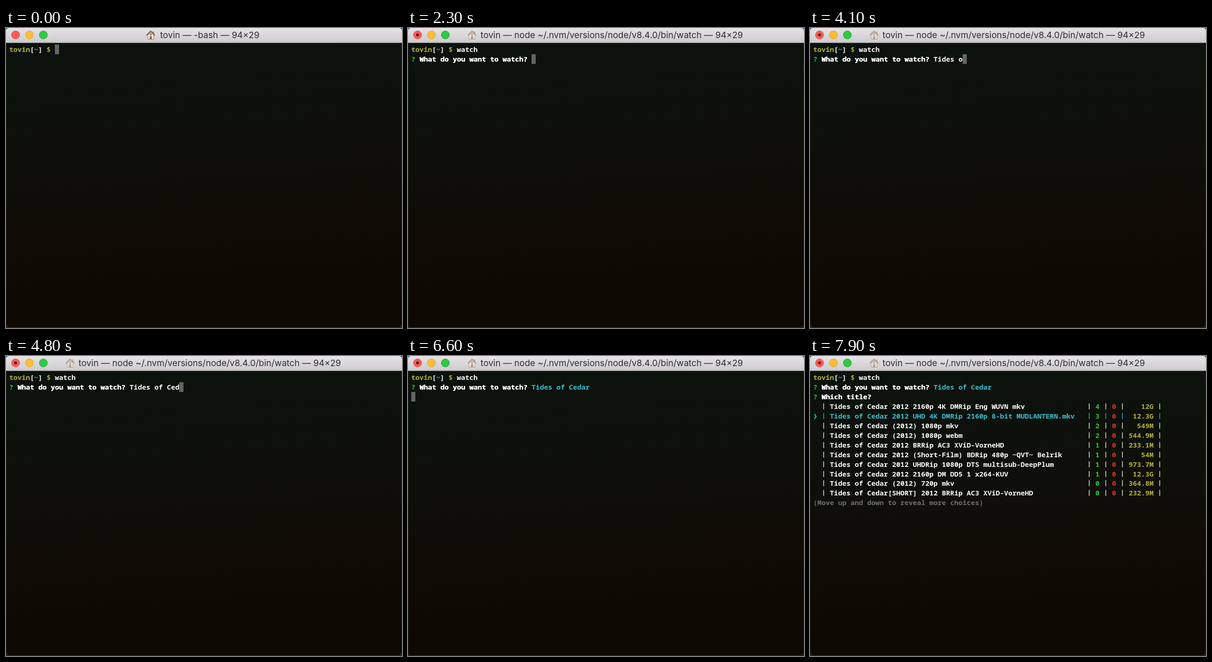
Recreate the animation shown at these times as an HTML page. Size 859x652 px, loop 8000 ms.

```html
<!DOCTYPE html>
<html lang="en">
<head>
<meta charset="utf-8">
<title>Terminal session</title>
<style>
  html, body { margin: 0; width: 100%; height: 100%; overflow: hidden; background: #2b2013; }
  #win {
    position: absolute; left: 0; top: 0; width: 859px; height: 652px; overflow: hidden;
    background: linear-gradient(#2d6480, #24372f 8px, #2b2013);
  }
  #body {
    position: absolute; left: 0; top: 0; width: 858px; height: 650px; box-sizing: border-box;
    border-left: 1px solid #1e211c; border-radius: 7px;
    background: linear-gradient(176deg, #0b120d 6%, #0f0f09 42%, #0f0b05 68%, #0e0803 88%);
  }
  #bar { position: absolute; left: 0; top: 0; width: 859px; height: 33px; }
  #bar text { font: 400 19px Inter, Roboto, sans-serif; fill: #2e2d2f; text-anchor: middle; }
  #term { font: 600 15px/21px "Noto Sans Mono", "DejaVu Sans Mono", monospace; color: #fbfbf9; }
  .row { position: absolute; left: 7px; height: 21px; white-space: pre; font-variant-ligatures: none; }
  .row span { white-space: pre; }
  .olive { color: #b2b138; }
  .cyan { color: #38bfd0; }
  .green { color: #34c437; }
  .red { color: #cd3720; }
  .gray { color: #6e6e6a; }
  .bold { font-weight: 700; }
  .ask { font-weight: 800; color: #fff; text-shadow: .5px 0 #fff; }
  .row .pipe, .row .mark {
    display: inline-block; width: 9px; text-align: center; line-height: 1;
    position: relative; font-weight: 700;
  }
  .pipe { font-size: 12px; top: -2px; }
  .mark { font-size: 15px; font-family: "DejaVu Sans Mono", "DejaVu Sans", monospace; }
  #cursor { position: absolute; width: 9px; height: 21px; background: #646462; }
</style>
</head>
<body>
<div id="win">
  <div id="body"></div>
  <svg id="bar" viewBox="0 0 859 33">
    <defs>
      <linearGradient id="metal" x2="0" y2="1">
        <stop offset="0" stop-color="#e5e3e5"/>
        <stop offset="1" stop-color="#cdcbcd"/>
      </linearGradient>
    </defs>
    <path d="M0 32V7Q0 0 7 0H852Q859 0 859 7V32Z" fill="url(#metal)"/>
    <path d="M0 32H859" stroke="#a5a6a3"/>
    <circle cx="20.7" cy="15" r="8.8" fill="#fc5b55" stroke="#df4843"/>
    <circle cx="50.8" cy="15" r="8.8" fill="#fdbd36" stroke="#dea032"/>
    <circle cx="81" cy="15" r="8.8" fill="#2fc843" stroke="#25a936"/>
    <circle id="dot" cx="20.7" cy="15" r="3.1" fill="#51100c"/>
    <g id="home">
      <path d="M14.5 2.5h2.5v5l-2.5-2z" fill="#96674a"/>
      <path d="M3.5 10L10 4.2L16.5 10V19.5H3.5Z" fill="#f1ead9" stroke="#8b7c68"/>
      <path d="M.8 10.8L10 2L19.2 10.8" fill="none" stroke="#896046" stroke-width="2.4"/>
      <path d="M8.2 7.6h3.6v3.2h-3.6z" fill="#6fa0bd" stroke="#75695b" stroke-width=".7"/>
      <path d="M8.2 13.2h3.6v6h-3.6z" fill="#a35e37" stroke="#75513d" stroke-width=".7"/>
    </g>
    <text id="title" x="442" y="22.3"></text>
  </svg>
  <div id="term"></div>
</div>
<script>
const LOOP = 8000;
const USER = "tovin", FILM = "Tides of Cedar", QUESTION = "What do you want to watch?";

// Times in ms
const ENTER_CMD = 1400, NODE = 1500, ASK = 2300, ENTER_FILM = 5500, LIST = 6700, DOWN = 7800;
const CMD_KEYS = [600, 700, 800, 1000, 1100];
const filmKey = i => Math.floor((3300 + (i + 1) * 125) / 100) * 100;

// name after the film title, seeders, size
const CHOICES = [
  [" 2012 2160p 4K DMRip Eng WUVN mkv", 4, "12G"],
  [" 2012 UHD 4K DMRip 2160p 8-bit MUDLANTERN.mkv", 3, "12.3G"],
  [" (2012) 1080p mkv", 2, "549M"],
  [" (2012) 1080p webm", 2, "544.9M"],
  [" 2012 BRRip AC3 XViD-VorneHD", 1, "233.1M"],
  [" 2012 (Short-Film) BDRip 480p ~QVT~ Belrik", 1, "54M"],
  [" 2012 UHDRip 1080p DTS multisub-DeepPlum", 1, "973.7M"],
  [" 2012 2160p DM DD5 1 x264-KUV", 1, "12.3G"],
  [" (2012) 720p mkv", 0, "364.8M"],
  ["[SHORT] 2012 BRRip AC3 XViD-VorneHD", 0, "232.9M"]
];

const $ = id => document.getElementById(id);
const term = $("term");
const rowTop = r => Math.round(36 + r * 20.95);

function row(r, ...parts) {
  const div = document.createElement("div");
  div.className = "row";
  div.style.top = rowTop(r) + "px";
  for (const [text, cls = ""] of parts) {
    const span = document.createElement("span");
    span.className = cls;
    span.textContent = text;
    div.append(span);
  }
  term.append(div);
}

function cursor(r, col) {
  const box = document.createElement("div");
  box.id = "cursor";
  box.style.left = 7 + col * 9 + "px";
  box.style.top = rowTop(r) + "px";
  term.append(box);
}

function choice(r, [name, seeds, size], on) {
  const tint = on ? "cyan" : "";
  const pipe = ["|", "pipe " + tint], gap = [" "];
  row(r, on ? ["❯", "mark cyan"] : gap, gap, pipe,
    [(" " + FILM + name).padEnd(63), tint], pipe, gap,
    [String(seeds), "green"], gap, pipe, gap, ["0", "red"], gap, pipe, gap,
    [size.padStart(6), "olive"], gap, pipe);
}

function stateAt(t) {
  return {
    cmd: CMD_KEYS.filter(k => t >= k).length,
    film: [...FILM].filter((_, i) => t >= filmKey(i)).length,
    ran: t >= ENTER_CMD,
    node: t >= NODE,
    ask: t >= ASK,
    sent: t >= ENTER_FILM,
    list: t >= LIST,
    pick: t >= DOWN ? 1 : 0
  };
}

function draw(s) {
  const job = s.node ? "node ~/.nvm/versions/node/v8.4.0/bin/watch" : "-bash";
  $("title").textContent = `${USER} — ${job} — 94×29`;
  $("dot").style.opacity = s.node ? 1 : 0;
  $("home").setAttribute("transform", `translate(${s.node ? 129 : 304} 5)`);
  $("home").style.opacity = s.node ? .5 : 1;

  term.textContent = "";
  if (!s.ran) cursor(0, 11 + s.cmd);
  else if (!s.ask) cursor(1, 0);
  else if (!s.sent) cursor(1, 29 + s.film);
  else if (!s.list) cursor(2, 0);

  row(0, [USER, "olive"], ["[", "bold"], ["~", "cyan bold"], ["]", "bold"],
    [" $ ", "olive"], ["watch".slice(0, s.cmd)]);
  if (s.ask) {
    row(1, ["? ", "green"], [QUESTION, "ask"],
      [" " + FILM.slice(0, s.film), s.sent ? "cyan" : ""]);
  }
  if (s.list) {
    row(2, ["? ", "green"], ["Which title?", "ask"],
      [s.pick ? "" : " (Use arrow keys)", "gray"]);
    CHOICES.forEach((c, i) => choice(3 + i, c, i === s.pick));
    row(13, ["(Move up and down to reveal more choices)", "gray"]);
  }
}

let last = "";
const start = performance.now();
function tick() {
  const s = stateAt((performance.now() - start) % LOOP);
  const key = JSON.stringify(s);
  if (key !== last) {
    last = key;
    draw(s);
  }
  requestAnimationFrame(tick);
}
tick();
</script>
</body>
</html>
```
